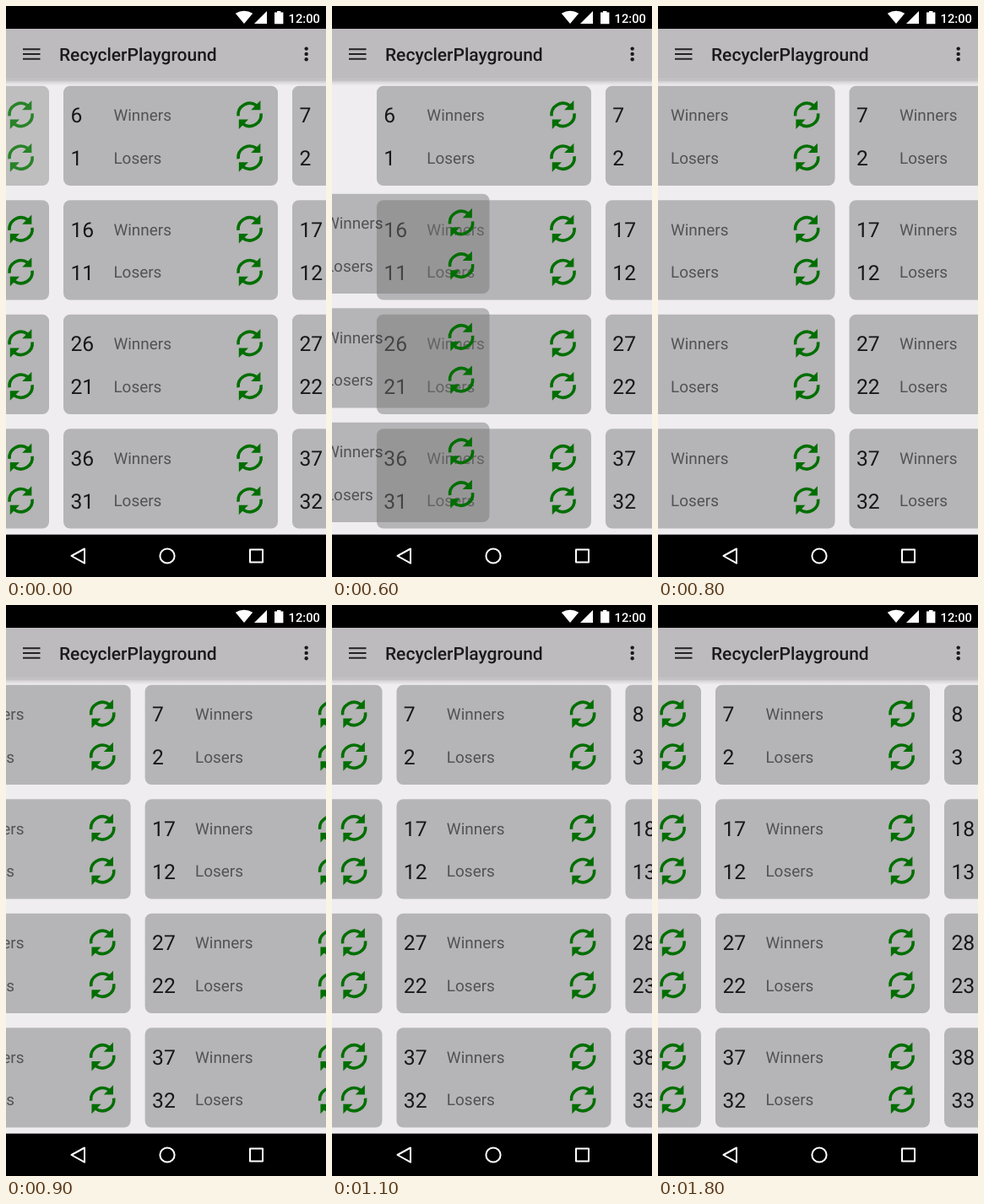
An HTML page that plays this animation: 379 px wide and 677 px high, repeating every 2.8 s.

```html
<!DOCTYPE html>
<html lang="en">
<head>
<meta charset="utf-8">
<title>RecyclerPlayground</title>
<style>
  html, body { margin: 0; width: 100%; height: 100%; overflow: hidden; background: #000; }
  svg { display: block; width: 100vw; height: 100vh; }
  text { font-family: Roboto, sans-serif; text-rendering: geometricPrecision; }
  .num { font-size: 24.7px; fill: rgba(0, 0, 0, .87); }
  .label { font-size: 18.95px; fill: rgba(0, 0, 0, .54); }
  .title { font-size: 21px; font-weight: 500; fill: #1a1a1a; }
  .clock { font-size: 14.7px; font-weight: 500; fill: #fff; }
  .card { fill: rgba(118, 117, 118, .48); }
</style>
</head>
<body>
<svg viewBox="0 0 379 677" preserveAspectRatio="none">
  <defs>
    <g id="sync">
      <g id="half">
        <path d="M-13.5 1.5A13.6 13.6 0 0 1 7.8 -11.1" fill="none" stroke="#006e00" stroke-width="3.6"/>
        <path d="M12.8 -17V-5.6H1.6Z" fill="#006e00"/>
      </g>
      <use href="#half" transform="rotate(180)"/>
    </g>
    <linearGradient id="shade" x2="0" y2="1">
      <stop offset="0" stop-color="#000" stop-opacity=".25"/>
      <stop offset=".5" stop-color="#000" stop-opacity=".09"/>
      <stop offset="1" stop-color="#000" stop-opacity="0"/>
    </linearGradient>
  </defs>

  <rect y="27" width="379" height="600" fill="#efedf0"/>
  <g id="grid"></g>
  <g id="removed"></g>
  <g id="wrapped"></g>

  <rect y="86.5" width="379" height="8" fill="url(#shade)"/>
  <rect y="27" width="379" height="59.5" fill="#bdbbbd"/>
  <path d="M20 51.3H40.5M20 57H40.5M20 62.7H40.5" stroke="#222" stroke-width="2.1"/>
  <text class="title" x="63" y="65">RecyclerPlayground</text>
  <g fill="#1a1a1a">
    <circle cx="355.7" cy="50.6" r="2.2"/>
    <circle cx="355.7" cy="56.9" r="2.2"/>
    <circle cx="355.7" cy="63.2" r="2.2"/>
  </g>

  <rect width="379" height="27" fill="#000"/>
  <g fill="#fff">
    <path d="M282 21L271.8 8.8Q282 2.6 292.2 8.8Z"/>
    <path d="M309 6V21H294Z"/>
    <path d="M318 7.6H321V6H325.4V7.6H328.4V21.2H318Z"/>
  </g>
  <text class="clock" x="334.6" y="20">12:00</text>

  <rect y="626.7" width="379" height="51" fill="#000"/>
  <g fill="none" stroke="#fff" stroke-width="2" stroke-linejoin="round">
    <path d="M77.5 652L93 643.5V660.7Z"/>
    <circle cx="191" cy="652" r="8.6"/>
    <rect x="289" y="644.5" width="15" height="15"/>
  </g>
</svg>
<script>
const LOOP = 2800, STEP = 50, SPAN = 680, SWITCH = 497;
const COL = 271, ROW = 135.5, COLS = 10;
const [grid, removed, wrapped] = ['grid', 'removed', 'wrapped'].map(id => document.getElementById(id));

function line(n, label, y) {
  return `<text class="num" x="8.4" y="${y + 9.6}">${n}</text>
    <text class="label" x="59.4" y="${y + 7.2}">${label}</text>
    <use href="#sync" x="220.6" y="${y}"/>`;
}

function addCard(layer, row, col) {
  const n = row * COLS + col;
  layer.insertAdjacentHTML('beforeend',
    `<g transform="translate(${68 + (col - 1) * COL} ${94.7 + row * ROW})">
      <rect class="card" width="254" height="118.3" rx="8"/>
      ${line(n + 5, 'Winners', 34.2)}${line(n, 'Losers', 85)}
    </g>`);
}

for (let row = 0; row < 5; row++) {
  addCard(row ? wrapped : removed, row, 0);
  for (let col = 1; col < 4; col++) addCard(grid, row, col);
}

// Accelerate-decelerate curve, clamped to 0..1
const ease = t => (1 - Math.cos(Math.PI * Math.min(1, Math.max(0, t)))) / 2;
const move = (el, x, y) => el.setAttribute('transform', `translate(${x} ${y})`);

function render(ms) {
  const t = Math.floor(ms % LOOP / STEP) * STEP;
  removed.setAttribute('opacity', 1 - ease((t - SWITCH) / SPAN + 1));
  const p = ease((t - SWITCH) / SPAN);
  move(grid, -COL * p, 0);
  // First cards of later rows travel to the end of the row above
  move(wrapped, (COLS - 1) * COL * p, -ROW * p);
}

const start = performance.now();
function tick() {
  render(performance.now() - start);
  requestAnimationFrame(tick);
}
tick();
</script>
</body>
</html>
```
